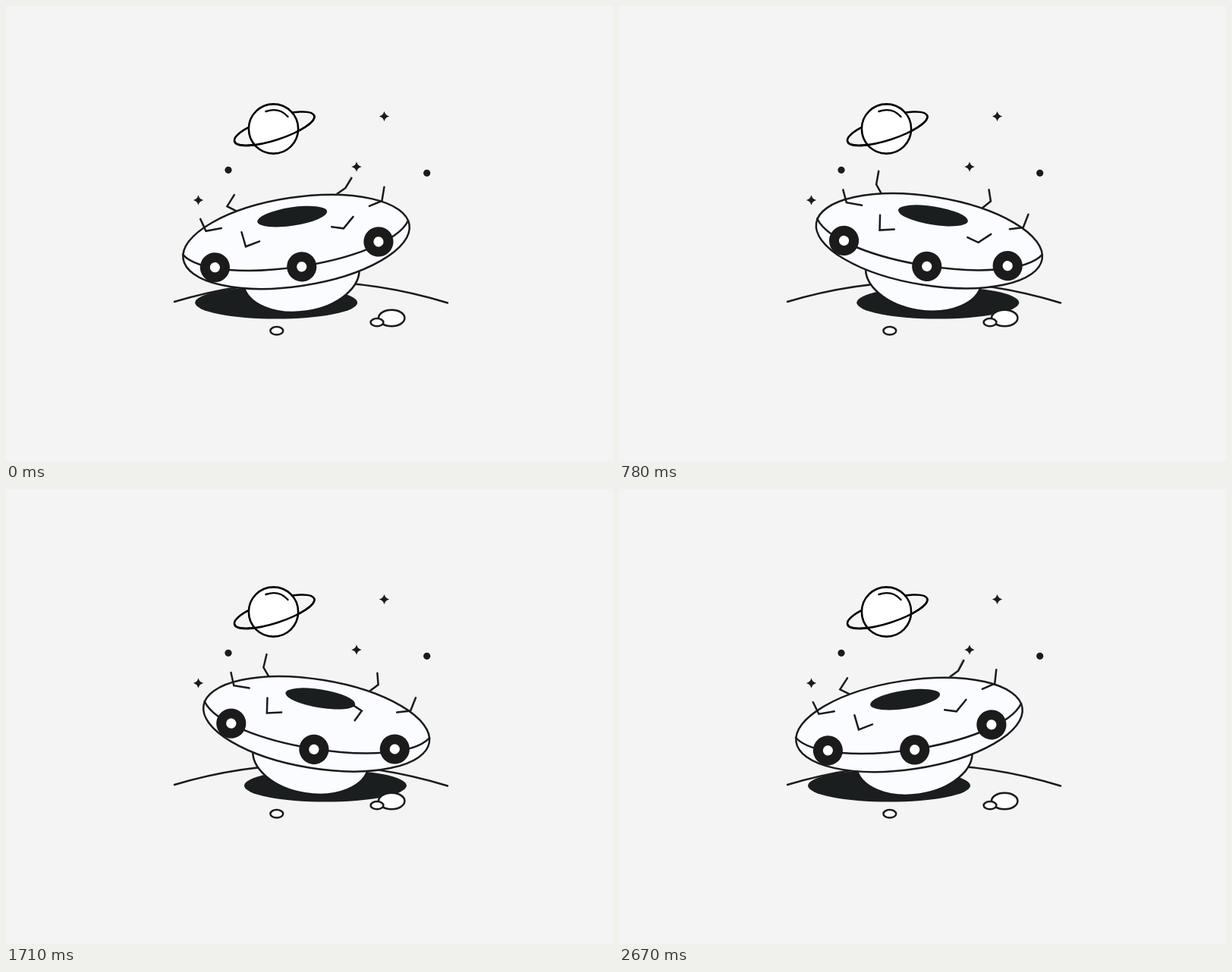
An HTML page with a canvas for the animation above (2.7 s loop, 800x600 px).

```html
<!DOCTYPE html>
<html lang="en">
<head>
<meta charset="utf-8">
<title>Rocking saucer</title>
<style>
  html, body { margin: 0; width: 100%; height: 100%; overflow: hidden; background: #f4f4f4; }
  canvas { display: block; width: 800px; height: 600px; }
</style>
</head>
<body>
<canvas id="stage" width="800" height="600"></canvas>
<script>
const ctx = document.getElementById('stage').getContext('2d');
const STEP = 30, STEPS = 90, LOOP = STEP * STEPS;
const BG = '#f4f4f4', INK = '#1b1b1c', DARK = '#1a1e1e', PALE = '#fafcff', TRAIL = '#c9cacc';
const RAD = Math.PI / 180;

// Bent feelers in saucer space, angles in degrees clockwise from up.
// The tip turns from rest by swing, beats times per loop, first at step peak;
// the shin follows at lean + flex * tip angle.
const feelers = [
  { x: -94.8, y: -31.8, shin: 20.6, tip: 17.5, lean: -96.5, flex: -0.3, rest: -15, swing: -27, beats: 3, peak: 17, sharp: 1 },
  { x: -72.3, y: -51.6, shin: 13.1, tip: 17.8, lean: -38, flex: -0.4, rest: 0, swing: 42, beats: 2, peak: 43, sharp: 2 },
  { x: -47.7, y: -7.2, shin: 19.3, tip: 19.8, lean: -106, flex: -0.5, rest: -7.5, swing: 11, beats: 3, peak: 14, sharp: 6 },
  { x: 62.8, y: -53.8, shin: 13.6, tip: 15.4, lean: 49, flex: 0.36, rest: -18, swing: 59, beats: 2, peak: 1, sharp: 4 },
  { x: 102.4, y: -31.6, shin: 18, tip: 18.6, lean: 70, flex: 0.35, rest: 12, swing: 32, beats: 3, peak: 6, sharp: 4 },
  { x: 49.3, y: -12, shin: 15.8, tip: 20, lean: 73, flex: 0.7, rest: 48, swing: -115, beats: 1, peak: 56, sharp: 4 }
];

const smooth = u => {
  u = Math.min(1, Math.max(0, u));
  return u * u * (3 - 2 * u);
};

// 0 = tilted left, 1 = tilted right, with a short rest at both ends
function rock(t) {
  const rise = s => smooth((t - s) / 1170);
  return rise(-30) - smooth((t - 1365) / 1145) + rise(LOOP - 30);
}

function tipAngle({ rest, swing, beats, peak, sharp }, step) {
  const wave = Math.cos(2 * Math.PI * beats * (step - peak) / STEPS);
  return rest + swing * Math.pow((1 + wave) / 2, sharp);
}

function paint(fill, stroke, width = 2.5) {
  if (fill) { ctx.fillStyle = fill; ctx.fill(); }
  if (stroke) { ctx.strokeStyle = stroke; ctx.lineWidth = width; ctx.stroke(); }
}

function ellipse(x, y, rx, ry, fill, stroke, width) {
  ctx.beginPath();
  ctx.ellipse(x, y, rx, ry, 0, 0, Math.PI * 2);
  paint(fill, stroke, width);
}

function star(x, y) {
  const r = 6.7, k = 1.3;
  ctx.beginPath();
  ctx.moveTo(x, y - r);
  ctx.quadraticCurveTo(x + k, y - k, x + r, y);
  ctx.quadraticCurveTo(x + k, y + k, x, y + r);
  ctx.quadraticCurveTo(x - k, y + k, x - r, y);
  ctx.quadraticCurveTo(x - k, y - k, x, y - r);
  paint(INK);
}

function ring(end) {
  ctx.beginPath();
  ctx.ellipse(353.7, 161.7, 55.2, 15, -18 * RAD, 0, end);
  paint(null, '#000', 2.6);
}

function sky() {
  ring(Math.PI * 2);
  ellipse(352.5, 162, 32.6, 32.6, '#fff', '#000', 2.6);
  ring(Math.PI);
  ctx.beginPath();
  ctx.moveTo(342.5, 139);
  ctx.quadraticCurveTo(360, 133, 371.5, 146);
  paint(null, '#000', 2.4);
  star(498.5, 145.5);
  star(462, 212);
  star(253.5, 256);
  ellipse(293, 216.3, 4.6, 4.6, INK);
  ellipse(554.7, 220.3, 4.6, 4.6, INK);
}

function ground(shadowX) {
  ctx.beginPath();
  ctx.moveTo(222, 390);
  ctx.quadraticCurveTo(402, 336.3, 582, 391.5);
  paint(null, INK);
  ellipse(shadowX, 391.2, 107, 21.4, DARK);
}

function rocks() {
  ellipse(508.2, 411.5, 17.2, 10.7, '#fff', INK);
  ellipse(489, 417.2, 8.4, 5.1, '#fff', INK);
  ellipse(356.8, 428.3, 8.4, 5.2, '#fff', INK);
}

function wheel(x, y) {
  ellipse(x, y, 19.6, 19.6, INK);
  ellipse(x, y, 6.6, 6.6, '#fff');
}

function feeler({ x, y, shin, tip, lean, flex }, angle, color) {
  const lower = (lean + flex * angle) * RAD, upper = angle * RAD;
  const kneeX = x + shin * Math.sin(lower), kneeY = y - shin * Math.cos(lower);
  ctx.beginPath();
  ctx.moveTo(x, y);
  ctx.lineTo(kneeX, kneeY);
  ctx.lineTo(kneeX + tip * Math.sin(upper), kneeY - tip * Math.cos(upper));
  paint(null, color);
}

function saucer(v, step) {
  const s = 2 * v - 1;
  ctx.save();
  ctx.translate(382.2 + 34.3 * v, 309 + 1.1 * s * s - 0.3 * s);
  ctx.rotate((-8.63 + 22.9 * v) * RAD);

  ellipse(0, 45.5, 77, 47.7, PALE, INK);
  ellipse(0.2, 0.6, 150.7, 58.5, PALE, INK);
  ctx.beginPath();
  ctx.moveTo(-150.2, -5);
  ctx.bezierCurveTo(-115, 46.4, 115, 46.4, 150.2, -5);
  paint(null, INK);
  ellipse(-0.1, -33.2, 46.5, 12.1, DARK);
  wheel(-110.8, 18);
  wheel(2.4, 34.2);
  wheel(107.4, 16.7);

  // a fast feeler leaves a pale trail of its previous pose
  for (const f of feelers) {
    const now = tipAngle(f, step), last = tipAngle(f, step - 1);
    if (Math.abs(now - last) > 3) feeler(f, last, TRAIL);
    feeler(f, now, INK);
  }
  ctx.restore();
}

function draw(now) {
  const step = Math.floor((now % LOOP) / STEP);
  const v = rock(step * STEP);
  ctx.fillStyle = BG;
  ctx.fillRect(0, 0, 800, 600);
  ctx.lineCap = 'round';
  ctx.lineJoin = 'miter';
  sky();
  ground(356 + 83 * v);
  saucer(v, step);
  rocks();
}

let start = null;
function tick(now) {
  if (start === null) start = now;
  draw(now - start);
  requestAnimationFrame(tick);
}
draw(0);
requestAnimationFrame(tick);
</script>
</body>
</html>
```
